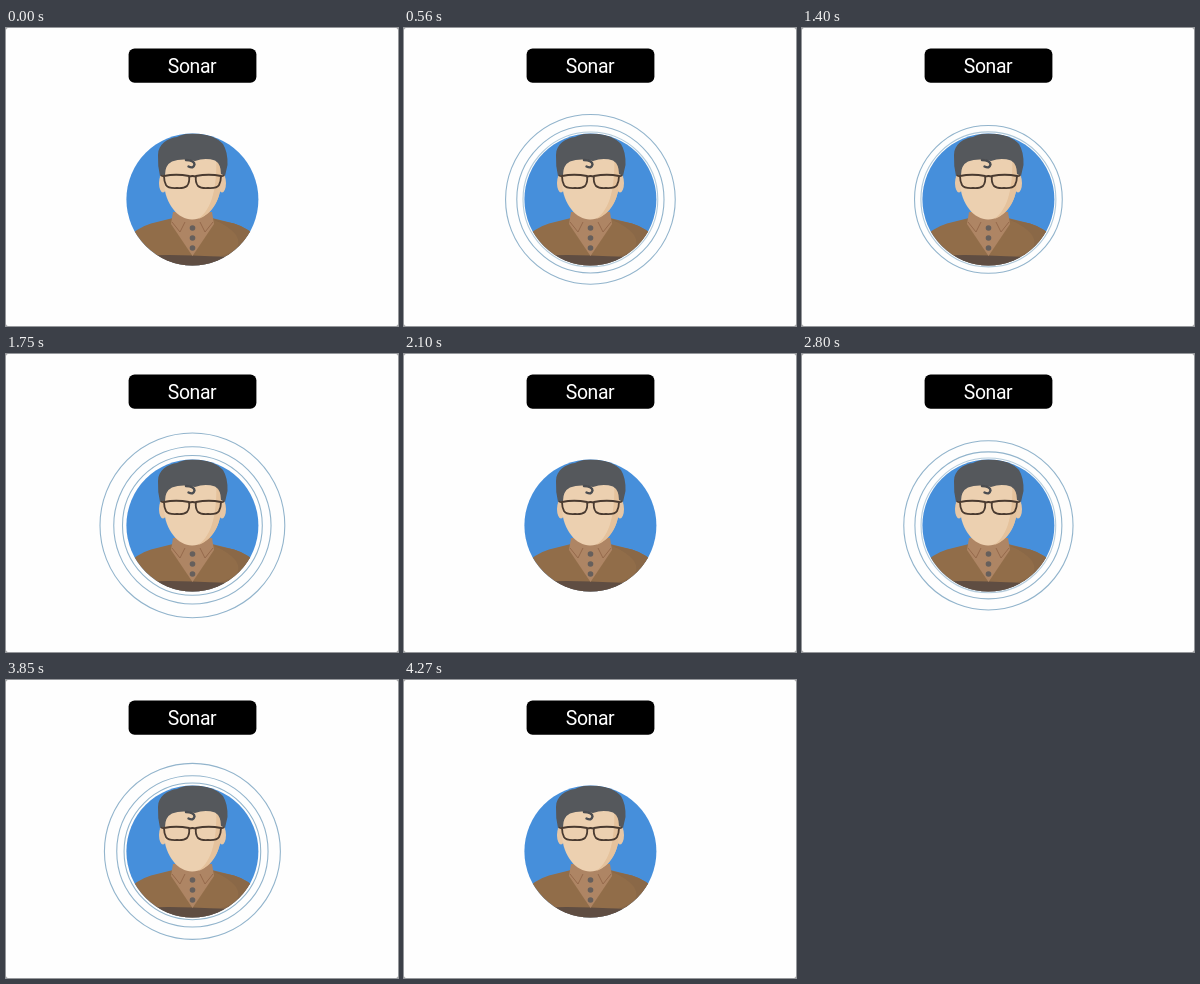
Recreate the animation shown at these times as an HTML page. Size 392x298 px, loop 4.34 s.

```html
<!DOCTYPE html>
<html lang="en">
<head>
<meta charset="utf-8">
<title>Sonar</title>
<style>
html, body { margin: 0; width: 100%; height: 100%; overflow: hidden; background: #888; }
svg { display: block; width: 392px; height: 298px; }
text { font: 19.4px Roboto, sans-serif; letter-spacing: -.4px; fill: #fff; text-anchor: middle; }
#rings { fill: none; stroke: #92b4cc; stroke-width: 1.1; }
</style>
</head>
<body>
<svg viewBox="0 0 392 298">
  <defs><clipPath id="disc"><circle cx="186.4" cy="171.4" r="66"/></clipPath></defs>
  <rect width="392" height="298" rx="2" fill="#fefefe"/>
  <rect x="122.6" y="20.6" width="127.8" height="34.2" rx="6"/>
  <text x="186" y="44.9">Sonar</text>

  <g id="rings"></g>

  <g clip-path="url(#disc)">
    <path fill="#468fdb" d="M120 105h133v133H120z"/>
    <!-- shirt -->
    <path fill="#916d49" d="M120 240V212Q130 200 145 195.500L167 190H206L228 195.500Q243 200 253 212V240z"/>
    <path fill="#8a6847" d="M206 191L228 195.500Q243 200 253 212V228H214Q239 222 230 207 223 198 206 191z"/>
    <path fill="#5f4d42" d="M120 229Q150 226 186.5 227.5T253 229V240H120z"/>
    <path fill="#ae8564" d="M167 184L165 196 186.5 228 208 196 206 184z"/>
    <path fill="none" stroke="#94694b" d="M166 194L174 204 179 194M207 194L199 204 194 194"/>
    <g fill="#665f5c">
      <circle cx="186.5" cy="200" r="2.8"/>
      <circle cx="186.5" cy="210" r="2.8"/>
      <circle cx="186.5" cy="220" r="2.8"/>
    </g>
    <!-- head -->
    <g fill="#e7c7a5">
      <ellipse cx="157" cy="155" rx="4" ry="9.5"/>
      <ellipse cx="216" cy="155" rx="4" ry="9.5"/>
    </g>
    <path fill="#ecd0b0" d="M158 120H215V155C214 177 200 191 186.5 191.500S159 177 158 155z"/>
    <path fill="#e5c29c" d="M210 120H215V155C214 175 204 187 192 191 206 181 212 160 210 120z"/>
    <path fill="#55585c" d="M154 148Q151.500 138 152 127C152 116 162 110 171 109Q178 105 187 105.500C201 105 212 110 217 116Q222 124 221.500 137L219 148 215 146Q215 136 209 132.500 199 129.500 189 133 176 130 166 133.500 159 137 159 147z"/>
    <path fill="none" stroke="#4b4d51" stroke-width="2.4" stroke-linecap="round" d="M180 132Q188.500 132.500 188.500 136.500 187.500 141 182.500 138.500"/>
    <!-- glasses -->
    <g fill="none" stroke="#493a30" stroke-width="1.8">
      <path id="lens" d="M158 148Q170 145.500 183 148 184 154 181 158 178 160.500 171 160 162 160.500 160 157 158 153 158 148z"/>
      <use href="#lens" transform="matrix(-1 0 0 1 373 0)"/>
      <path d="M155 147.500L158 148.500M183 149Q186.500 147 190 149M215 148.500L218 147.500"/>
    </g>
  </g>
</svg>
<script>
const LOOP = 4340, BASE = 66, GROWTH = 40, MAX = 39, RISE = 800, DELAY = 200;
const FADE_START = 760, FADE_TIME = 150;

// Each pulse: start, speed, hard end
const pulses = [
  [12, 1, 1000],
  [980, 0.843, 2095],
  [2255, 1, 2900],
  [3258, 1, 4265]
];

const rings = [0, 1, 2].map(() => {
  const ring = document.createElementNS("http://www.w3.org/2000/svg", "circle");
  ring.setAttribute("cx", 186.4);
  ring.setAttribute("cy", 171.4);
  return document.getElementById("rings").appendChild(ring);
});

function draw(now) {
  const time = now % LOOP;
  const pulse = pulses.find(([start, , end]) => time >= start && time < end);
  const phase = pulse ? (time - pulse[0]) * pulse[1] : 0;
  const fade = Math.max(0, Math.min(1, 1 - (phase - FADE_START) / FADE_TIME));
  rings.forEach((ring, i) => {
    const age = Math.max(0, phase - i * DELAY);
    const grown = Math.min(MAX, GROWTH * (age / RISE) ** 2);
    ring.setAttribute("r", BASE + grown);
    ring.setAttribute("opacity", fade * Math.min(1, grown / 2));
  });
  requestAnimationFrame(draw);
}
draw(performance.now());
</script>
</body>
</html>
```
